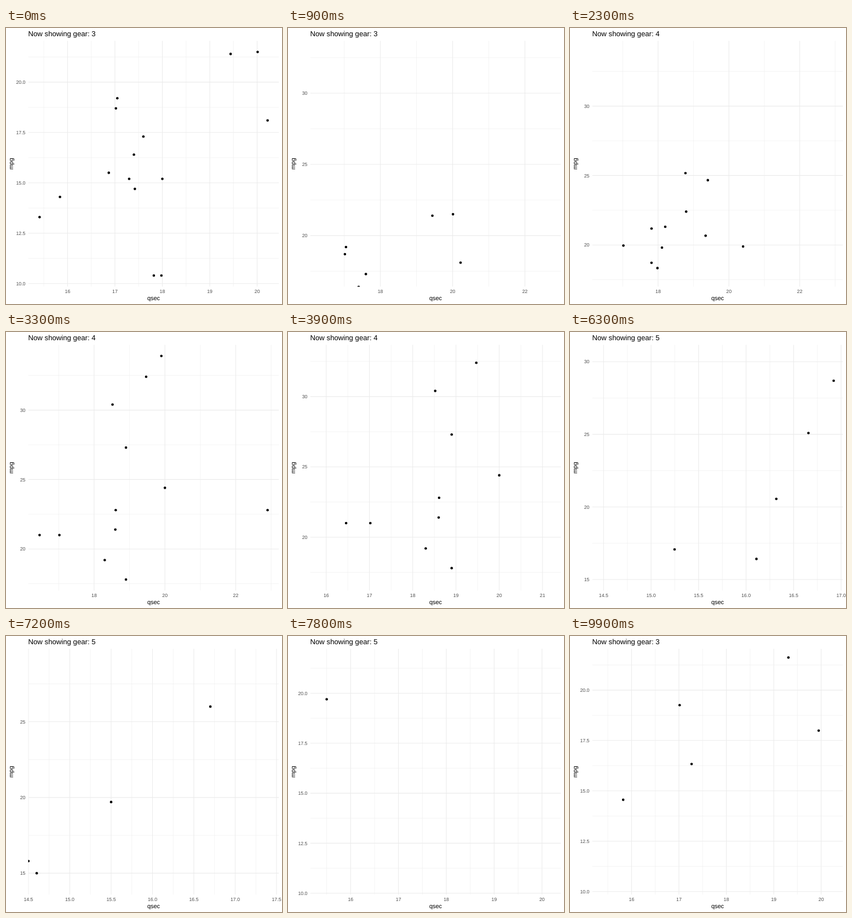
Recreate the animation shown at these times as an HTML page. Size 504 px wide and 504 px high, loop 10000 ms.

```html
<!DOCTYPE html>
<html lang="en">
<head>
<meta charset="utf-8">
<title>Gear scatter plot</title>
<style>
  html, body { margin: 0; width: 100%; height: 100%; overflow: hidden; background: #fff; }
  svg { display: block; width: 504px; height: 504px; }
  text { font-family: "Liberation Sans", Arial, Helvetica, sans-serif; text-rendering: geometricPrecision; }
  #grid { stroke: #ebebeb; }
  #ticks { font-size: 8.8px; fill: #4d4d4d; }
</style>
</head>
<body>
<svg viewBox="0 0 504 504">
  <clipPath id="panel"><rect x="40.5" y="23.3" width="458" height="449.1"/></clipPath>
  <g clip-path="url(#panel)">
    <g id="grid"></g>
    <g id="points"></g>
  </g>
  <g id="ticks"></g>
  <text id="title" x="40.5" y="15" font-size="13.2"></text>
  <text x="269.5" y="496.5" font-size="11" text-anchor="middle">qsec</text>
  <text transform="translate(13.4 247.85) rotate(-90)" font-size="11" text-anchor="middle">mpg</text>
</svg>
<script>
const FRAME_MS = 100, FRAMES = 100;
const LEFT = 40.5, RIGHT = 498.5, TOP = 23.3, BOTTOM = 472.4;

// [qsec, mpg] of each car, grouped by number of gears
const gears = [
  [[19.44, 21.4], [17.02, 18.7], [20.22, 18.1], [15.84, 14.3], [17.4, 16.4],
   [17.6, 17.3], [18, 15.2], [17.98, 10.4], [17.82, 10.4], [17.42, 14.7],
   [20.01, 21.5], [16.87, 15.5], [17.3, 15.2], [15.41, 13.3], [17.05, 19.2]],
  [[16.46, 21], [17.02, 21], [18.61, 22.8], [20, 24.4], [22.9, 22.8], [18.3, 19.2],
   [18.9, 17.8], [19.47, 32.4], [18.52, 30.4], [19.9, 33.9], [18.9, 27.3], [18.6, 21.4]],
  [[16.7, 26], [16.9, 30.4], [14.5, 15.8], [15.5, 19.7], [14.6, 15]]
];

// The view pans ahead of the points; the title switches midway. All in frames.
const phases = [
  { view: [1, 12], move: [11, 33], title: 23 },
  { view: [34, 46], move: [45, 67], title: 57 },
  { view: [68, 80], move: [79, 100], title: 91 }
];

const byId = id => document.getElementById(id);
const lerp = (a, b, t) => a + (b - a) * t;
const cubicInOut = t => t < 0.5 ? 4 * t ** 3 : 1 - 4 * (1 - t) ** 3;
const progress = ([from, to], n) => Math.min(1, Math.max(0, (n - from) / (to - from)));

function limits(cars, axis) {
  const values = cars.map(car => car[axis]);
  const lo = Math.min(...values), hi = Math.max(...values), pad = (hi - lo) * 0.05;
  return [lo - pad, hi + pad];
}
const views = gears.map(cars => [limits(cars, 0), limits(cars, 1)]);

// Extended Wilkinson labelling: weighs simplicity, coverage and density
function axisBreaks([lo, hi]) {
  const nice = [1, 5, 2, 2.5, 4, 3], wanted = 5, range = hi - lo;
  let best = { score: -Infinity };
  for (let skip = 1; skip <= 2; skip++) {
    nice.forEach((q, rank) => {
      const simplicity = 1 - rank / (nice.length - 1) - skip;
      for (let count = 2; count <= 10; count++) {
        for (let power = -2; power <= 1; power++) {
          const step = skip * q * 10 ** power, span = step * (count - 1);
          if (span > 2 * range || span < range / 3) continue;
          const first = (Math.floor(hi / step) - count + 1) * skip;
          const last = Math.ceil(lo / step) * skip;
          for (let s = first; s <= last; s++) {
            const start = s * step / skip, end = start + span;
            const coverage = 1 - 0.5 * ((hi - end) ** 2 + (lo - start) ** 2) / (0.1 * range) ** 2;
            const ratio = (count - 1) / span * (Math.max(end, hi) - Math.min(start, lo)) / (wanted - 1);
            const density = 2 - Math.max(ratio, 1 / ratio);
            const score = 0.25 * simplicity + 0.2 * coverage + 0.5 * density + 0.05;
            if (score > best.score + 1e-12) best = { score, start, step, count };
          }
        }
      }
    });
  }
  const major = [], minor = [];
  for (let i = -2; i <= 2 * best.count; i++) {
    const value = +(best.start + i * best.step / 2).toFixed(6);
    if (value < lo || value > hi) continue;
    (i % 2 === 0 && i >= 0 && i < 2 * best.count ? major : minor).push(value);
  }
  return { major, minor };
}

function labels(values) {
  const digits = Math.max(0, ...values.map(v => (String(v).split(".")[1] || "").length));
  return values.map(v => v.toFixed(digits));
}

function carsAt(from, to, t) {
  if (t === 0) return from;
  if (t === 1) return to;
  return from.slice(0, to.length).map((car, i) => car.map((v, axis) => lerp(v, to[i][axis], t)));
}

function draw(n) {
  let now = 0;
  while (now < 2 && n >= phases[now].move[1]) now++;
  const phase = phases[now], next = (now + 1) % 3;
  const zoom = cubicInOut(progress(phase.view, n));
  const [xLim, yLim] = views[now].map((lim, axis) => lim.map((v, i) => lerp(v, views[next][axis][i], zoom)));
  const x = v => lerp(LEFT, RIGHT, (v - xLim[0]) / (xLim[1] - xLim[0]));
  const y = v => lerp(BOTTOM, TOP, (v - yLim[0]) / (yLim[1] - yLim[0]));

  const xs = axisBreaks(xLim), ys = axisBreaks(yLim);
  const lines = (kind, width) => {
    const d = ys[kind].map(v => `M${LEFT} ${y(v)}H${RIGHT}`)
      .concat(xs[kind].map(v => `M${x(v)} ${TOP}V${BOTTOM}`)).join("");
    return `<path d="${d}" stroke-width="${width}"/>`;
  };
  byId("grid").innerHTML = lines("minor", 0.533) + lines("major", 1.067);

  const xText = labels(xs.major).map((s, i) =>
    `<text x="${x(xs.major[i])}" y="484" text-anchor="middle">${s}</text>`);
  const yText = labels(ys.major).map((s, i) =>
    `<text x="35.5" y="${y(ys.major[i]) + 3.15}" text-anchor="end">${s}</text>`);
  byId("ticks").innerHTML = xText.concat(yText).join("");

  byId("points").innerHTML = carsAt(gears[now], gears[next], progress(phase.move, n))
    .map(([qsec, mpg]) => `<circle cx="${x(qsec)}" cy="${y(mpg)}" r="2.31"/>`).join("");
  byId("title").textContent = `Now showing gear: ${3 + (n >= phase.title ? next : now)}`;
}

const began = performance.now();
let shown = -1;
function tick() {
  const n = Math.floor((performance.now() - began) / FRAME_MS) % FRAMES;
  if (n !== shown) draw(shown = n);
  requestAnimationFrame(tick);
}
tick();
</script>
</body>
</html>
```
